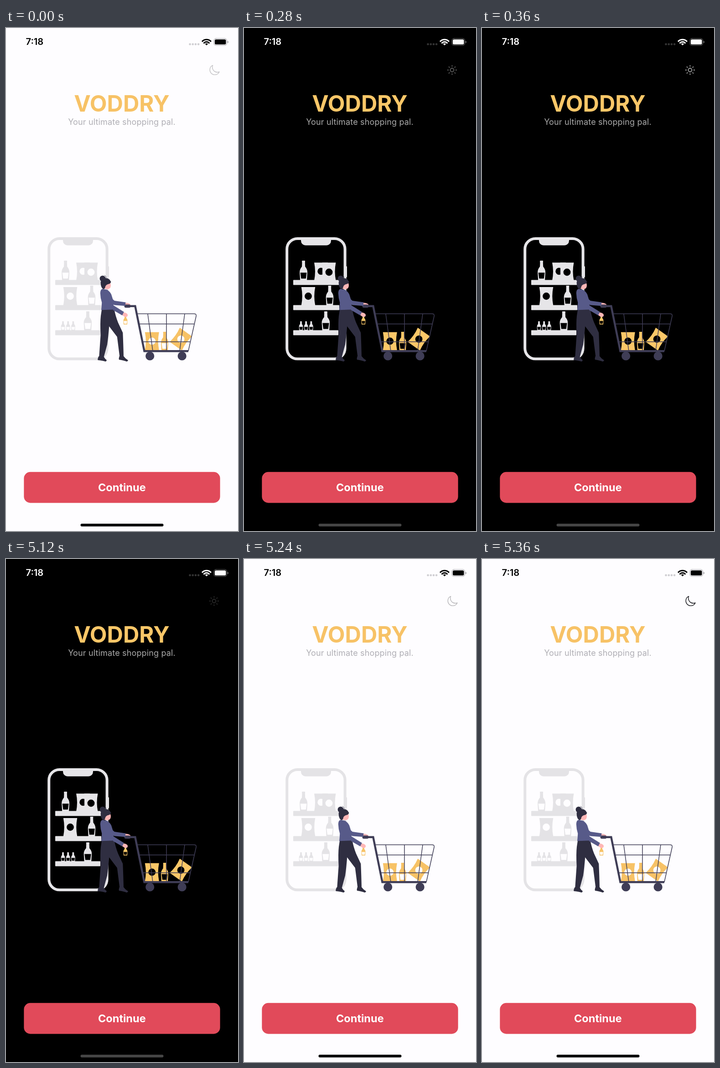
Animation of 509x1101 px, one loop 5.4 s. Source, as an HTML page with a canvas:

```html
<!DOCTYPE html>
<html lang="en">
<head>
<meta charset="utf-8">
<title>Shopping app theme toggle</title>
<style>
  html, body { margin: 0; width: 100%; height: 100%; overflow: hidden; background: #fefdff; }
  canvas { display: block; width: 509px; height: 1101px; }
</style>
</head>
<body>
<canvas id="stage"></canvas>
<script>
const W = 509, H = 1101, LOOP = 5400, STEP = 40;
const DARK_FROM = 240, PRESS = 5120, LIGHT_FROM = 5240;
const RED = '#e14a5a', NAVY = '#2f2e41', METAL = '#3f3d56', SHIRT = '#575a89', SKIN = '#ffb6b6';
const THEMES = {
  light: { bg: '#fefdff', ink: '#000', icon: '#17171c', sub: '#b0afb5', dots: '#cfced2',
           home: '#000', phone: '#e4e3e6', gold: '#f7c266', rim: '#9c9ba0' },
  dark:  { bg: '#000', ink: '#fff', icon: '#fff', sub: '#a9a9a9', dots: '#353535',
           home: '#454545', phone: '#e6e5e8', gold: '#fbc768', rim: '#777' }
};
const MOON = new Path2D('M160 136c0-30.62 4.51-61.61 16-88C99.57 81.27 48 159.32 48 248' +
  'c0 119.29 96.71 216 216 216 88.68 0 166.73-51.57 200-128-26.39 11.49-57.38 16-88 16' +
  '-119.29 0-216-96.71-216-216z');

const canvas = document.getElementById('stage');
const ctx = canvas.getContext('2d');
const ratio = window.devicePixelRatio || 1;
canvas.width = W * ratio;
canvas.height = H * ratio;
let theme;

function fill(color, d) {
  ctx.fillStyle = color;
  ctx.fill(new Path2D(d));
}

function stroke(color, width, d) {
  ctx.strokeStyle = color;
  ctx.lineWidth = width;
  ctx.stroke(new Path2D(d));
}

function box(color, x, y, w, h, r = 0) {
  ctx.fillStyle = color;
  ctx.beginPath();
  ctx.roundRect(x, y, w, h, r);
  ctx.fill();
}

function disc(color, x, y, r) {
  ctx.fillStyle = color;
  ctx.beginPath();
  ctx.arc(x, y, r, 0, Math.PI * 2);
  ctx.fill();
}

function label(str, x, y, font, color, spacing = 0) {
  ctx.font = font + ' Inter, sans-serif';
  ctx.letterSpacing = spacing + 'px';
  ctx.textAlign = 'center';
  ctx.fillStyle = color;
  ctx.fillText(str, x, y);
}

function bottle(color, x, top, bottom, half) {
  const h = bottom - top, neck = half * 0.36, w = half * 0.82;
  ctx.save();
  ctx.translate(x, top);
  box(color, -neck - 0.3, 0, 2 * neck + 0.6, h * 0.08, 0.6);
  fill(color, `M${-neck} 0H${neck}L${neck + 0.5} ${h * 0.3}Q${half} ${h * 0.44} ${half} ${h * 0.58}
    L${half * 0.88} ${h}H${-half * 0.88}L${-half} ${h * 0.58}
    Q${-half} ${h * 0.44} ${-neck - 0.5} ${h * 0.3}Z`);
  fill(theme.bg, `M${-w} ${h * 0.61}H${w}L${w * 0.74} ${h * 0.92}H${-w * 0.74}Z`);
  ctx.restore();
}

function bag(color, x, y, w, h, turn = 0, hole = true) {
  const a = w / 2, b = h / 2;
  ctx.save();
  ctx.translate(x, y);
  ctx.rotate(turn);
  fill(color, `M${-a} ${-b}H${a}Q${a - 4} 0 ${a} ${b}H${-a}Q${-a + 4} 0 ${-a} ${-b}Z`);
  if (hole) disc(theme.bg, 0, 0, 7.9);
  ctx.restore();
}

function statusBar() {
  const { ink, dots, rim } = theme;
  label('7:18', 62.8, 37.4, '600 20px', ink);
  for (let i = 0; i < 4; i++) disc(dots, 403.6 + i * 6.2, 35.5, 2.3);
  ctx.strokeStyle = ink;
  ctx.lineWidth = 3.1;
  for (const r of [7.7, 12.8]) {
    ctx.beginPath();
    ctx.arc(440, 38, r, -Math.PI * 0.75, -Math.PI * 0.25);
    ctx.stroke();
  }
  fill(ink, 'M440 38L436.8 34.8Q440 32.4 443.2 34.8Z');
  ctx.strokeStyle = rim;
  ctx.lineWidth = 1;
  ctx.beginPath();
  ctx.roundRect(456, 23, 28.5, 15, 4.5);
  ctx.stroke();
  box(ink, 458, 25, 24.5, 11, 2.8);
  box(rim, 486, 28.2, 1.8, 4.8, [0, 2, 2, 0]);
}

function toggleIcon(dark, alpha) {
  ctx.save();
  ctx.globalAlpha = alpha;
  ctx.translate(dark ? 456.5 : 457.6, 92);
  ctx.scale(0.05, 0.05);
  ctx.strokeStyle = theme.icon;
  ctx.lineWidth = 28;
  ctx.lineCap = ctx.lineJoin = 'round';
  if (dark) {
    ctx.beginPath();
    ctx.arc(0, 0, 80, 0, Math.PI * 2);
    for (let i = 0; i < 8; i++) {
      const c = Math.cos(i * Math.PI / 4), s = Math.sin(i * Math.PI / 4);
      ctx.moveTo(c * 160, s * 160);
      ctx.lineTo(c * 200, s * 200);
    }
    ctx.stroke();
  } else {
    ctx.translate(-256, -256);
    ctx.stroke(MOON);
  }
  ctx.restore();
}

function phone() {
  const c = theme.phone;
  ctx.strokeStyle = c;
  ctx.lineWidth = 6;
  ctx.beginPath();
  ctx.roundRect(94.2, 461, 127.4, 263.3, 23);
  ctx.stroke();
  box(c, 125, 460, 66, 15.8, [0, 0, 10, 10]);
  box(c, 223.5, 521.5, 2.5, 24, 1);
  [[551.5, 102], [606.5, 101], [661.5, 99]].forEach(([y, w]) => box(c, 108, y, w, 11, 1));

  bottle(c, 130.6, 509.5, 552, 8.5);
  bag(c, 169, 533, 30, 39, 0, false);
  disc(theme.bg, 169, 532.5, 7.7);
  box(c, 172, 514, 10, 38);
  bag(c, 186.5, 533, 30, 39, 0, false);
  disc(theme.bg, 186.5, 534.5, 7.9);

  bag(c, 141, 587, 30.5, 40);
  bottle(c, 188, 564, 607, 8.3);

  for (let i = 0; i < 3; i++) bottle(c, 125 + i * 11.2, 642, 662, 4.4);
  bottle(c, 179.4, 620.5, 662, 8.8);
}

function cart() {
  const gold = theme.gold;
  bag(gold, 320.3, 685.5, 31, 39.5);
  bottle(gold, 348, 665, 705.5, 8);
  bag(gold, 383.6, 681, 33, 38, 0.62);

  ctx.lineJoin = 'round';
  ctx.lineCap = 'butt';
  stroke(METAL, 1.5, `M287 625.6H412.5Q418 625.6 417.2 630.5L400 707
    M292 647.8H413M300 686.7H405M311 626L322 707M352 626V707M392 626L381 707`);
  ctx.lineJoin = 'miter';
  stroke(METAL, 4.4, 'M262 608.8H283.4L303.5 707.2H400');
  disc(METAL, 315.7, 718, 9.6);
  disc(METAL, 386.2, 718, 9.6);
}

function woman() {
  // far hand and sleeve
  fill(SKIN, 'M261 601.5Q268 601 272.5 604.5Q274 607 270 608L261 608.5Z');
  box(METAL, 259.5, 605.2, 14, 7, 3.5);
  fill(SHIRT, 'M230 590L238 597L262.5 600.5L261.5 608.2L238 606.5L228 602Z');

  // trousers and shoes
  fill(NAVY, `M210 616.5L237.5 615.5Q240 630 246 645L256.3 667Q257.5 695 258 719H249.3
    L243.8 676L226.3 653Q224.5 676 222 693L214.5 720.5H204.2L207.6 672Q206.3 645 208 630Z`);
  fill(NAVY, 'M203.5 718.5Q200.5 724 201.5 727Q212 728 218 730Q221.5 729 220.5 726.5Q217 724 214.5 719.5Z');
  fill(NAVY, 'M249 718Q247 723 248 726Q258 727.5 264.5 730Q268.5 729 267.5 727Q262 724 258.2 718.5Z');

  // held bottle, hand, near sleeve and torso
  bottle(theme.gold, 262, 629, 649, 4.5);
  fill(SKIN, 'M257 622.5Q265 623 267 627.5Q267.5 632 262 633Q258 631 254.5 628Z');
  fill(SHIRT, 'M234 606L258.8 621.5L255 629L235 617.5Z');
  fill(SHIRT, `M212 571Q207 572 206.8 580Q207 591 210.3 601L209 617.2L237 616.3
    Q235 605 236.2 600Q233 589 231 583Q228 577 222 573Z`);

  // head
  fill(SKIN, 'M215 560L229 558Q231.5 566 227.5 570Q223 573 219 571L213 571Z');
  fill(NAVY, `M208 562Q206 551 214 548.5Q222 545.5 227 550.5L230.4 555.5Q229.5 560 223 561
    Q218 563 217.5 568Q216 572 213.5 571.5Q209 569 208 562Z`);
  disc(NAVY, 212, 548.4, 6.4);
  ctx.lineCap = 'round';
  stroke(NAVY, 0.8, 'M216 541.3Q220.5 543 219.5 549');
}

// Opacity of the toggle while it is pressed and released.
function iconAlpha(t) {
  if (t < DARK_FROM) return 0.25;
  if (t >= PRESS && t < LIGHT_FROM) return 0.22;
  const light = t >= LIGHT_FROM;
  const p = Math.min(1, (t - (light ? LIGHT_FROM : DARK_FROM)) / (light ? 120 : 160));
  return 0.3 + 0.7 * p * (light ? Math.sqrt(2 - p) : 1);
}

function draw(time) {
  const t = Math.floor((time % LOOP) / STEP) * STEP;
  const dark = t >= DARK_FROM && t < LIGHT_FROM;
  theme = dark ? THEMES.dark : THEMES.light;
  ctx.setTransform(ratio, 0, 0, ratio, 0, 0);
  document.body.style.background = theme.bg;
  box(theme.bg, 0, 0, W, H);

  statusBar();
  toggleIcon(dark, iconAlpha(t));
  label('VODDRY', 254, 182.8, '700 49px', theme.gold);
  label('Your ultimate shopping pal.', 254, 212, '400 18px', theme.sub, 0.15);
  phone();
  cart();
  woman();
  box(RED, 39.3, 971.8, 430.4, 67.6, 14);
  label('Continue', 254.3, 1014, '700 23.5px', '#fff');
  box(theme.home, 163.5, 1085, 182, 6, 3);
}

const start = performance.now();
function tick() {
  draw(performance.now() - start);
  requestAnimationFrame(tick);
}
tick();
</script>
</body>
</html>
```
